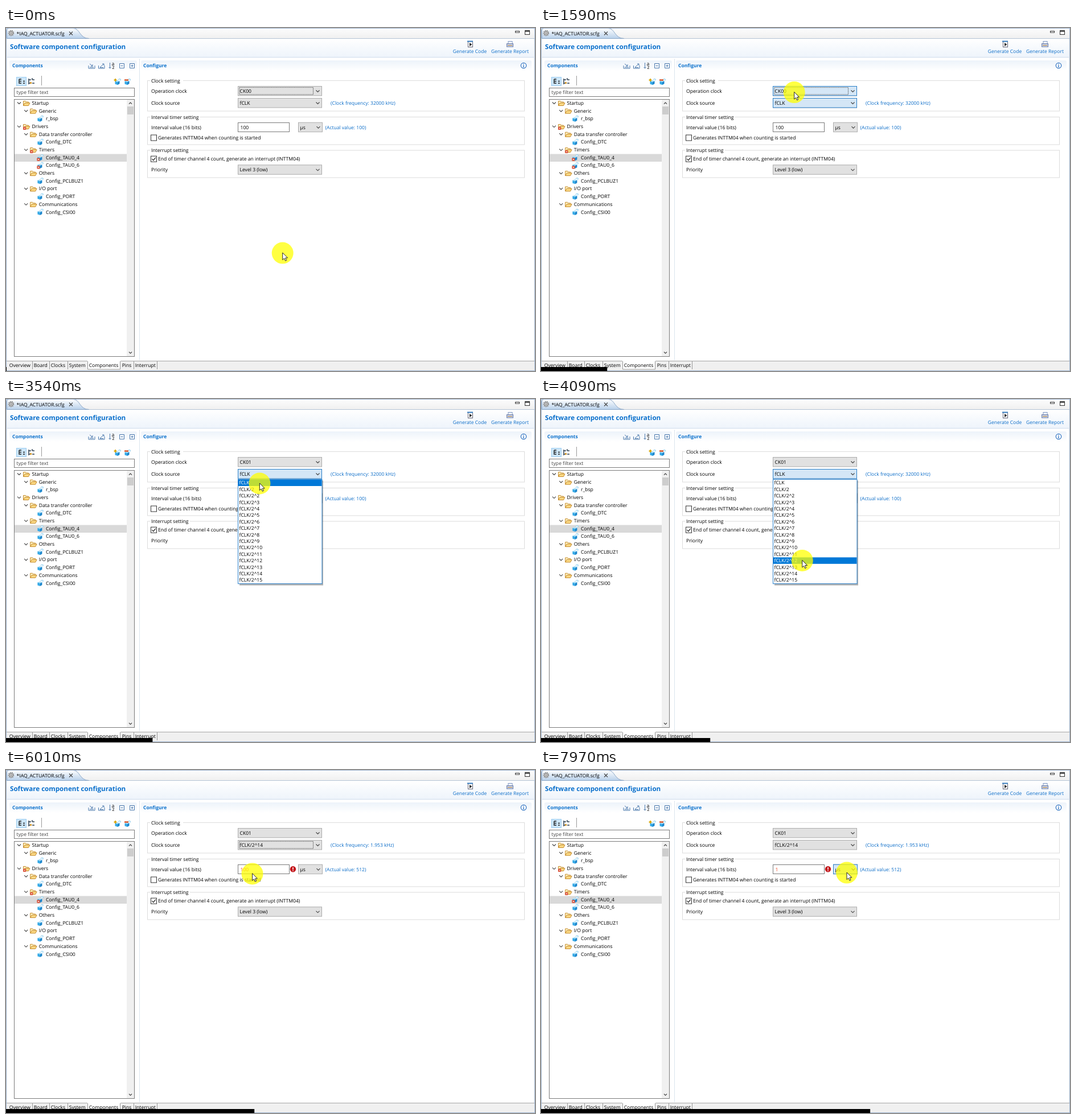
These frames come from a looping animation (929x603 px, 8000 ms). An HTML page:

```html
<!DOCTYPE html>
<html lang="en">
<head>
<meta charset="utf-8">
<title>Software component configuration</title>
<style>
html, body { margin: 0; width: 100%; height: 100%; overflow: hidden; background: #fff; }
svg { display: block; width: 100%; height: 100%; }
text { font: 8.6px "Open Sans", "Noto Sans", sans-serif; text-rendering: geometricPrecision; white-space: pre; fill: #000; }
.title { font-size: 11.65px; font-weight: 700; fill: #0a70cc; }
.head { font-size: 8.5px; font-weight: 700; fill: #0a70cc; }
.link { font-size: 8.5px; fill: #0a6cc8; }
.hint { fill: #444; }
.white { fill: #fff; }
.mid { text-anchor: middle; }
.line { fill: none; stroke: #444; stroke-width: 1.1; }
.frame { fill: none; stroke: #dcdcdc; }
.box { fill: #fff; stroke: #7a7a7a; }
.gray { fill: #e1e1e1; stroke: #adadad; }
.hot { fill: #d4e6f6; stroke: #2a7fc8; }
</style>
</head>
<body>
<svg id="stage" viewBox="0 0 929 603"></svg>
<script>
const LOOP = 8000;
const OPEN_CLOCK = 1900, PICK_CLOCK = 2560, OPEN_SOURCE = 3060, PICK_SOURCE = 4950;
const PRESS_INPUT = 6180, TYPE_DIGIT = 7200;
const ROW = 11.4, TREE_STEP = 13.68;

const rect = (x, y, w, h, attrs = '') => `<rect x="${x}" y="${y}" width="${w}" height="${h}" ${attrs}/>`;
const path = (d, attrs = 'class="line"') => `<path d="${d}" ${attrs}/>`;
const text = (x, y, s, attrs = '') => `<text x="${x}" y="${y}" ${attrs}>${s}</text>`;
const at = (x, y, body, attrs = '') => `<g transform="translate(${x} ${y})" ${attrs}>${body}</g>`;
const chevron = (x, y, r = 3) => path(`M${x - r} ${y - r / 2}l${r} ${r} ${r} ${-r}`);

const gradient = (id, top, bottom) => `<linearGradient id="${id}" x2="0" y2="1">
  <stop stop-color="${top}"/><stop offset="1" stop-color="${bottom}"/></linearGradient>`;

const cube = (x, y) => at(x, y,
  path('M.5 5.5L5 6.8V12L.5 10.5Z', 'fill="#35a9e6"') +
  path('M5 6.8L8.5 5V10L5 12Z', 'fill="#1c86cc"') +
  path('M.5 5.5L4 4 8.5 5 5 6.8Z', 'fill="#a6def8"') +
  path('M5.5 3.2L8 1.2 10.5 2 10 4.5', 'fill="#e4f4fd" stroke="#7cc6ec" stroke-width=".8"'));

const folder = (x, y) => at(x, y,
  path('M.5 9.5V1.5H4.5L5.5 3H9.5V5', 'fill="#fff3c4" stroke="#c48a2c"') +
  path('M.5 9.5L3 4.8H12L9.5 9.5Z', 'fill="#fbd984" stroke="#c48a2c"'));

const errorMark = (x, y) => rect(x, y, 5.2, 5.2, 'rx=".8" fill="#d8452c"') +
  path(`M${x + 1.4} ${y + 1.4}l2.4 2.4m0-2.4l-2.4 2.4`, 'stroke="#fff" stroke-width=".9"');

function combo(id, x, y, w, label) {
  return rect(x, y, w, 16.5, 'class="gray"') +
    rect(x, y, w, 16.5, `class="hot" id="${id}Hot"`) +
    text(x + 3, y + 11.5, label, `id="${id}Text"`) +
    rect(x + 2.5, y + 2, w - 17.5, 12.5, `id="${id}Focus" fill="none" stroke="#222" stroke-width=".7" stroke-dasharray="1 .6"`) +
    chevron(x + w - 7, y + 8.5);
}

const group = (y, h, label, w) => rect(248.5, y, 662, h, 'class="frame"') +
  rect(253, y - 3, w, 6, 'fill="#fff"') + text(255, y + 3.2, label);

const checkbox = (id, y, label) => rect(254.5, y - 5, 10, 10, `id="${id}" fill="#fff" stroke="#333"`) +
  text(267, y + 3, label);

function popup(id, y, items) {
  const h = items.length * ROW + 1;
  const rows = items.map((s, i) => text(409.5, y + 9 + i * ROW, s)).join('');
  return `<g id="${id}">` +
    rect(410, y + 2, 147, h + 1, 'fill="#000" opacity=".3"') +
    rect(407.5, y, 147.5, h, 'fill="#fff" stroke="#2a80cc"') +
    rect(408, 0, 146.5, ROW, 'fill="#0078d7"') + rows + '</g>';
}

const tree = [
  [0, 'Startup'], [1, 'Generic'], [2, 'r_bsp'], [0, 'Drivers'],
  [1, 'Data transfer controller'], [2, 'Config_DTC'],
  [1, 'Timers'], [2, 'Config_TAU0_4'], [2, 'Config_TAU0_6'],
  [1, 'Others'], [2, 'Config_PCLBUZ1'], [1, 'I/O port'], [2, 'Config_PORT'],
  [1, 'Communications'], [2, 'Config_CSI00']
];
const faulty = [3, 6, 7, 8];

function treeRow([level, label], i) {
  const x = 30 + level * 12.2, y = 132 + i * TREE_STEP;
  return (level < 2 ? chevron(x - 7, y) + folder(x, y - 5) : cube(x + .5, y - 6.5)) +
    text(x + 15.5, y + 3, label) +
    (faulty.includes(i) ? `<g id="error${i}">${errorMark(x, y + .8)}</g>` : '');
}

function windowFrame() {
  const tabs = [['Overview', 3], ['Board', 46], ['Clocks', 76], ['System', 108], ['Components', 143], ['Pins', 201], ['Interrupt', 224]];
  const gear = '<circle r="4.2" fill="#ddd" stroke="#888" stroke-width="2.2" stroke-dasharray="1.7 1.2"/><circle r="3" fill="none" stroke="#888"/><circle r="1.2" fill="#888"/>';
  return rect(0, 0, 929, 603, 'fill="#f0f0f0"') + rect(2, 18, 925, 567, 'fill="#fff"') +
    rect(0, 0, 929, 18, 'fill="url(#bar)"') +
    path('M1.5 18.5V4Q1.5 .5 5 .5H118C130 .5 129 18.5 146 18.5Z', 'fill="url(#tab)" stroke="#8ca8c8"') +
    path('M146 18.5H929', 'stroke="#b5c4d6"') +
    at(9, 9, gear) + text(18.5, 12.8, '*IAQ_ACTUATOR.scfg') +
    path('M111 6.5l6 6m0-6l-6 6') +
    rect(894.5, 5.5, 7, 2.5, 'fill="#fff" stroke="#333"') +
    rect(911.5, 4.5, 8, 7, 'fill="#fff" stroke="#333"') + path('M911 5.5H920', 'stroke="#333" stroke-width="2"') +
    rect(2, 19, 925, 32, 'fill="url(#header)"') + path('M2 51.5H927', 'stroke="#cfdcec"') +
    text(7, 37, 'Software component configuration', 'class="title"') +
    text(814.5, 44, 'Generate Code', 'class="link mid"') + text(885, 44, 'Generate Report', 'class="link mid"') +
    rect(811.5, 23.5, 8, 10, 'fill="#fff" stroke="#667"') + path('M814 26l4.5 3-4.5 3Z', 'fill="#222"') + path('M810 23.5H820', 'stroke="#357abd" stroke-width="2"') +
    rect(882, 23.5, 7, 5, 'fill="#fff" stroke="#7a94c0"') + rect(879.5, 27.5, 11, 5.5, 'fill="#c5d0e8" stroke="#6a7ca8"') + path('M881 30.5H889', 'stroke="#c9913a"') +
    path('M234.5 54V584', 'stroke="#dbe4ee"') +
    path('M0 585.5H929', 'stroke="#a6a6a6"') +
    rect(143, 585, 58, 15, 'fill="#fff"') +
    tabs.map(([s, x]) => text(x + 2.7, 596.3, s)).join('') +
    path('M46.5 586V600M76.5 586V600M108.5 586V600M143.5 586V600H200.5V586M224.5 586V600M265.5 586V600', 'fill="none" stroke="#999"') +
    rect(.5, .5, 928, 602, 'fill="none" stroke="#9fb4cf"');
}

function componentsPanel() {
  const blue = 'fill="none" stroke="#4a78ac"';
  return rect(6, 57, 224, 18, 'rx="3" fill="url(#section)"') + text(11, 69.3, 'Components', 'class="head"') +
    path('M145 66V71H156V66M147 63l5 4m0-3v3h-3M147 69H154', blue) +
    path('M162.5 66V71H173V66M165 69l7-6m-3 0h3v3M165 69.5H171', blue) +
    path('M182.5 61V71M180.5 69l2 2 2-2', blue) + text(185.5, 66, 'a', 'font-weight="700"') + text(186.5, 72, 'z') +
    path('M199.5 62.5H207.5V70.5H199.5ZM201.5 66.5H205.5', blue) +
    path('M217.5 62.5H225.5V70.5H217.5ZM219.5 66.5H223.5M221.5 64.5V68.5', blue) +
    rect(18.5, 86.5, 17, 15, 'fill="#cde6f9" stroke="#9accf0"') +
    path('M23 90H27M23 90V97H27M23 93.5H27M30 93.5H33M30 97H33', 'fill="none" stroke="#222" stroke-width="1.4"') +
    path('M40 89V99M40 91H44M40 97H44M46 91V88M46 91H50M46 97H50', 'fill="none" stroke="#345" stroke-width="1.5"') +
    rect(42, 95, 3, 3, 'fill="#d29a32"') +
    path('M62.5 84V101', 'stroke="#999"') +
    cube(191, 88) + path('M192 89v5m-2.5-2.5h5', 'stroke="#d8a400" stroke-width="2"') +
    cube(208, 88) + path('M208 91.5h7', 'stroke="#d8562a" stroke-width="2.5"') +
    rect(14.5, 105.5, 211, 15, 'class="box"') + text(18.5, 116, 'type filter text', 'class="hint"') +
    rect(14.5, 125.5, 211, 452, 'class="box"') + rect(15, 221.5, 197, 13.5, 'fill="#d9d9d9"') +
    rect(212, 126, 13, 451, 'fill="#f0f0f0"') + rect(213, 138, 11, 14, 'fill="#cdcdcd"') +
    path('M216 133.5l2.5-2.5 2.5 2.5M216 569.5l2.5 2.5 2.5-2.5') +
    tree.map(treeRow).join('');
}

function configurePanel() {
  return rect(237, 57, 686, 18, 'rx="3" fill="url(#section)"') + text(241, 69.3, 'Configure', 'class="head"') +
    '<circle cx="909" cy="66" r="4.7" fill="#fff" stroke="#2a6fc0" stroke-width="1.2"/>' +
    path('M909 65.2V69M909 63V64.2', 'stroke="#2a6fc0" stroke-width="1.4"') +
    group(92.5, 53.5, 'Clock setting', 58) + group(156.5, 48.5, 'Interval timer setting', 88) + group(215, 48, 'Interrupt setting', 70) +
    text(255, 114, 'Operation clock') + text(255, 135.2, 'Clock source') +
    text(255, 177.7, 'Interval value (16 bits)') + text(255, 252.2, 'Priority') +
    combo('clock', 407.5, 102.5, 147, 'CK00') + combo('source', 407.5, 123.5, 147, 'fCLK') +
    combo('unit', 513.5, 166.2, 42, 'µs') + combo('level', 407.5, 240.8, 147, 'Level 3 (low)') +
    text(570, 135.2, '', 'class="link" id="frequency"') + text(560.5, 177.7, '', 'class="link" id="actual"') +
    rect(407.5, 166.5, 90, 16, 'class="box" id="input"') +
    text(411.5, 177.7, '100', 'id="value"') +
    rect(411, 168.5, 0, 12, 'id="selection" fill="#0078d7"') +
    text(411.5, 177.7, '100', 'class="white" clip-path="url(#selected)"') +
    `<g id="alert"><circle cx="504" cy="174.3" r="5.2" fill="#c4161c"/>${path('M504 171V175.2M504 176.3V177.8', 'stroke="#fff" stroke-width="1.5"')}</g>` +
    checkbox('generates', 193, 'Generates INTTM04 when counting is started') +
    checkbox('interrupt', 230.2, 'End of timer channel 4 count, generate an interrupt (INTTM04)') +
    path('M256.5 230.2l2.3 2.4 4-5', 'fill="none" stroke="#222" stroke-width="1.3"');
}

const divisors = Array.from({ length: 16 }, (_, i) => 'fCLK' + (i ? '/2' + (i > 1 ? '^' + i : '') : ''));

document.getElementById('stage').innerHTML =
  '<defs>' + gradient('bar', '#fdfdfd', '#f0f0f0') + gradient('tab', '#ffffff', '#b8d0ea') +
  gradient('header', '#ffffff', '#eef4fb') + gradient('section', '#edf3fa', '#ffffff') +
  '<clipPath id="selected"><rect id="selectedArea" y="168" height="13"/></clipPath></defs>' +
  windowFrame() + componentsPanel() + configurePanel() +
  popup('clockList', 120, ['CK00', 'CK01']) + popup('sourceList', 141.3, divisors) +
  rect(0, 596, 0, 7, 'id="progress" fill="#000"') +
  '<g id="pointer"><circle id="halo" cy=".6" r="19" fill-opacity=".74"/><circle id="ring" cy=".6" fill="none" stroke="#ea4a1c" stroke-width="2.2"/>' +
  path('M0 0V12.6L2.9 9.9 4.9 14.3 6.9 13.4 5 9.1H8.9Z', 'fill="#fff" stroke="#111" stroke-width=".9"') + '</g>';

const el = {};
document.querySelectorAll('[id]').forEach(node => el[node.id] = node);
const set = (id, name, value) => el[id].setAttribute(name, value);
const show = (id, on) => set(id, 'display', on ? 'inline' : 'none');
const write = (id, s) => { if (el[id].textContent !== s) el[id].textContent = s; };

// Interpolates rows of [time, ...values], easing in and out of every key.
function track(keys, t) {
  const i = keys.findIndex(k => k[0] > t);
  if (i === 0) return keys[0].slice(1);
  if (i < 0) return keys[keys.length - 1].slice(1);
  const a = keys[i - 1], b = keys[i];
  const p = (t - a[0]) / (b[0] - a[0]), s = p * p * (3 - 2 * p);
  return a.slice(1).map((v, n) => v + (b[n + 1] - v) * s);
}

const pointerKeys = [
  [0, 485.7, 395], [300, 487, 395], [1590, 444.7, 112.5], [2050, 444, 112], [2400, 444, 134],
  [3380, 444, 134], [4300, 461, 306], [4800, 457, 305], [5300, 457, 305], [6080, 432, 179],
  [6200, 432, 179], [6650, 387, 179], [7480, 388, 180], [7920, 537, 180]
];
const hoverKeys = {
  clock: [[1450, 0], [1490, 1], [2680, 1], [2950, 0]],
  source: [[1330, 0], [1380, 1], [1590, 1], [1800, 0], [2710, 0], [2850, 1], [4950, 1], [5230, 0]],
  level: [[940, 0], [980, 1], [1020, 1], [1250, 0], [5620, 0], [5660, 1], [5700, 1], [5950, 0]],
  unit: [[7790, 0], [7840, 1]]
};
const releases = [1880, PICK_CLOCK, 3040, PICK_SOURCE, 6755];

// The click ring grows quickly, then shrinks while fading.
function ringAt(t) {
  const start = releases.find(r => t >= r && t < r + 450);
  if (start === undefined) return [0, 0];
  const age = t - start;
  if (age < 150) return [14 * age / 150, 1];
  const p = (age - 150) / 300;
  return [14 * (1 - .7 * p), (1 - p) * .9];
}

function showList(id, on, top, y, count) {
  show(id, on);
  const row = Math.max(0, Math.min(count - 1, Math.floor((y - top) / ROW)));
  const [mark, ...labels] = [...el[id].children].slice(2);
  mark.setAttribute('y', top + .3 + row * ROW);
  labels.forEach((label, i) => label.setAttribute('class', i === row ? 'white' : ''));
}

function render(t) {
  const [x, y] = track(pointerKeys, t);
  const [radius, alpha] = ringAt(t);
  const clockOpen = t >= OPEN_CLOCK && t < PICK_CLOCK;
  const sourceOpen = t >= OPEN_SOURCE && t < PICK_SOURCE;
  const slow = t >= PICK_SOURCE, typed = t >= TYPE_DIGIT;

  set('pointer', 'transform', `translate(${x} ${y})`);
  set('halo', 'fill', `rgb(255,${255 - 60 * alpha * radius / 14},0)`);
  set('ring', 'r', radius);
  set('ring', 'opacity', alpha);
  set('progress', 'width', 1 + .0724 * t);

  for (const id in hoverKeys) set(id + 'Hot', 'opacity', track(hoverKeys[id], t)[0]);
  show('clockFocus', t < 3000);
  show('sourceFocus', slow && t < PRESS_INPUT);
  show('unitFocus', false);
  show('levelFocus', false);
  showList('clockList', clockOpen, 120, y, 2);
  showList('sourceList', sourceOpen, 141.3, y, 16);

  const free = !clockOpen && !sourceOpen;
  const edge = (cy, right) => free && Math.abs(y - cy) < 5.5 && x > 254 && x < right ? '#0078d7' : '#333';
  set('generates', 'stroke', edge(193, 446));
  set('interrupt', 'stroke', edge(230.2, 516));

  write('clockText', t < PICK_CLOCK ? 'CK00' : 'CK01');
  write('sourceText', slow ? 'fCLK/2^14' : 'fCLK');
  write('frequency', `(Clock frequency: ${slow ? '1.953' : '32000'} kHz)`);
  write('actual', `(Actual value: ${slow ? 512 : 100})`);
  write('value', typed ? '1' : '100');
  el.value.style.fill = slow ? '#f0401a' : '#000';
  set('input', 'stroke', t >= PRESS_INPUT ? '#0078d7' : '#7a7a7a');
  show('alert', slow);

  const left = Math.max(411, Math.min(427, x));
  const width = t >= PRESS_INPUT && !typed ? 427 - left : 0;
  for (const id of ['selection', 'selectedArea']) {
    set(id, 'x', left);
    set(id, 'width', width);
  }

  for (const i of faulty) show('error' + i, t < PICK_CLOCK || (slow && i !== 8));
}

const begin = performance.now();
function tick() {
  render((performance.now() - begin) % LOOP);
  requestAnimationFrame(tick);
}
tick();
</script>
</body>
</html>
```
